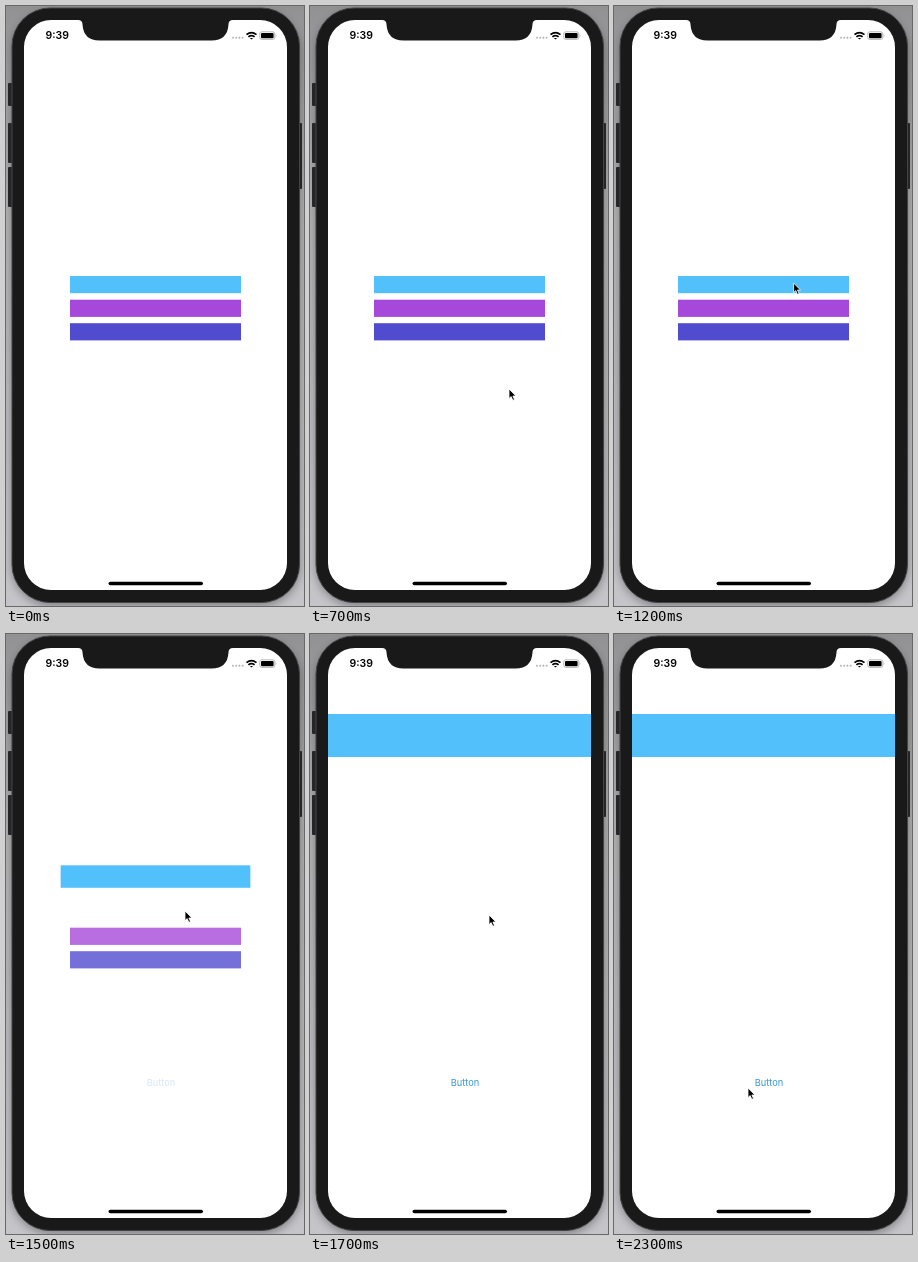
Write an HTML page that moves like this. It is 298 px wide and 600 px high and loops after 2400 ms.

```html
<!DOCTYPE html>
<html lang="en">
<head>
<meta charset="utf-8">
<title>Expanding bar</title>
<style>
  html, body { margin: 0; height: 100%; overflow: hidden; }
  svg { display: block; width: 298px; height: 600px; }
  text { font-family: Inter, "Liberation Sans", sans-serif; }
</style>
</head>
<body>
<svg viewBox="0 0 298 600">
  <defs>
    <linearGradient id="wall" x2="0" y2="1">
      <stop stop-color="#929294"/>
      <stop offset=".35" stop-color="#b2b2b4"/>
      <stop offset="1" stop-color="#c4c4c9"/>
    </linearGradient>
    <filter id="blur" x="-10%" width="120%"><feGaussianBlur stdDeviation="5"/></filter>
  </defs>

  <rect width="298" height="600" fill="url(#wall)"/>
  <rect x="6" y="6" width="288" height="594" rx="40" opacity=".35" filter="url(#blur)"/>

  <g fill="#262628">
    <rect x="2" y="77" width="6" height="23" rx="1"/>
    <rect x="2" y="117" width="6" height="40" rx="1"/>
    <rect x="2" y="161" width="6" height="40" rx="1"/>
    <rect x="291" y="117" width="5" height="66" rx="1"/>
  </g>
  <rect x="6" y="2" width="287.5" height="594.5" rx="38" fill="#19191a" stroke="#444446"/>
  <rect x="18" y="14" width="263" height="570" rx="27" fill="#fff"/>
  <path d="M72 13.5v.5q4.5 0 4.5 4.500q1 16 17 16h112q16 0 17-16q0-4.500 4.500-4.500v-.5z" fill="#19191a"/>

  <text x="39.500" y="33.200" font-size="10.500" font-weight="600">9:39</text>
  <path d="M227 31.700h10" stroke="#b4b4bc" stroke-width="2" stroke-linecap="round" stroke-dasharray="0 3.200"/>
  <g fill="none" stroke="#000" stroke-width="1.600">
    <path d="M240.500 28.700q5-4.200 10 0M242.400 30.900q3.100-2.500 6.200 0"/>
    <path d="M243.900 31.900h3.200l-1.600 1.700z" fill="#000" stroke="none"/>
  </g>
  <rect x="253.800" y="25.800" width="15" height="7.600" rx="2" fill="none" stroke="#a5a5a8" stroke-width=".8"/>
  <rect x="255" y="27" width="12.600" height="5.200" rx="1"/>
  <path d="M269.800 28.200q1.400 1.400 0 2.800z" fill="#a5a5a8"/>

  <g id="others">
    <rect x="64" y="293.700" width="171" height="17.200" fill="#a648d9"/>
    <rect x="64" y="317.200" width="171" height="17.200" fill="#514bd0"/>
  </g>
  <rect id="bar" fill="#52c0fb"/>
  <text id="button" x="155" y="451.800" font-size="9.300" text-anchor="middle" fill="#369ad0">Button</text>
  <rect x="102.500" y="575.700" width="94.500" height="3.600" rx="1.800"/>

  <path id="cursor" d="M0 0v9.600l2.200-2 1.600 3.700 1.700-.7-1.600-3.600h3z" stroke="#fff" stroke-width=".8"/>
</svg>
<script>
const LOOP = 2400, STEP = 100;
const [others, bar, button, cursor] =
  ["others", "bar", "button", "cursor"].map(id => document.getElementById(id));

// Pointer stops: time, x, y
const stops = [
  [500, 222, 560], [600, 211, 470], [700, 199, 383], [800, 190, 330],
  [900, 184, 298], [1000, 180, 277], [1500, 179, 277], [1600, 179, 281],
  [1900, 179, 281], [2000, 173, 304], [2100, 156, 368], [2200, 140, 432], [2300, 134, 454]
];

const mix = (a, b, p) => a + (b - a) * p;
const ease = (t, start, length) => {
  const u = Math.min(1, Math.max(0, (t - start) / length));
  return u * u * (3 - 2 * u);
};

function pointerAt(t) {
  const next = stops.findIndex(s => s[0] > t);
  if (next < 0) return stops.at(-1).slice(1);
  const [t0, x0, y0] = stops[next - 1], [t1, x1, y1] = stops[next];
  const p = (t - t0) / (t1 - t0);
  return [mix(x0, x1, p), mix(y0, y1, p)];
}

function draw(t) {
  const p = ease(t, 1442, 200);
  const box = { x: mix(64, 18, p), y: mix(270, 80, p), width: mix(171, 263, p), height: mix(17.2, 43, p) };
  for (const key in box) bar.setAttribute(key, box[key]);
  others.setAttribute("opacity", 1 - p);
  button.setAttribute("opacity", p);

  const shown = t >= stops[0][0];
  cursor.setAttribute("visibility", shown ? "visible" : "hidden");
  if (shown) cursor.setAttribute("transform", `translate(${pointerAt(t)})`);
}

function tick() {
  const t = performance.now() % LOOP;
  draw(Math.floor(t / STEP) * STEP);
  requestAnimationFrame(tick);
}
tick();
</script>
</body>
</html>
```
